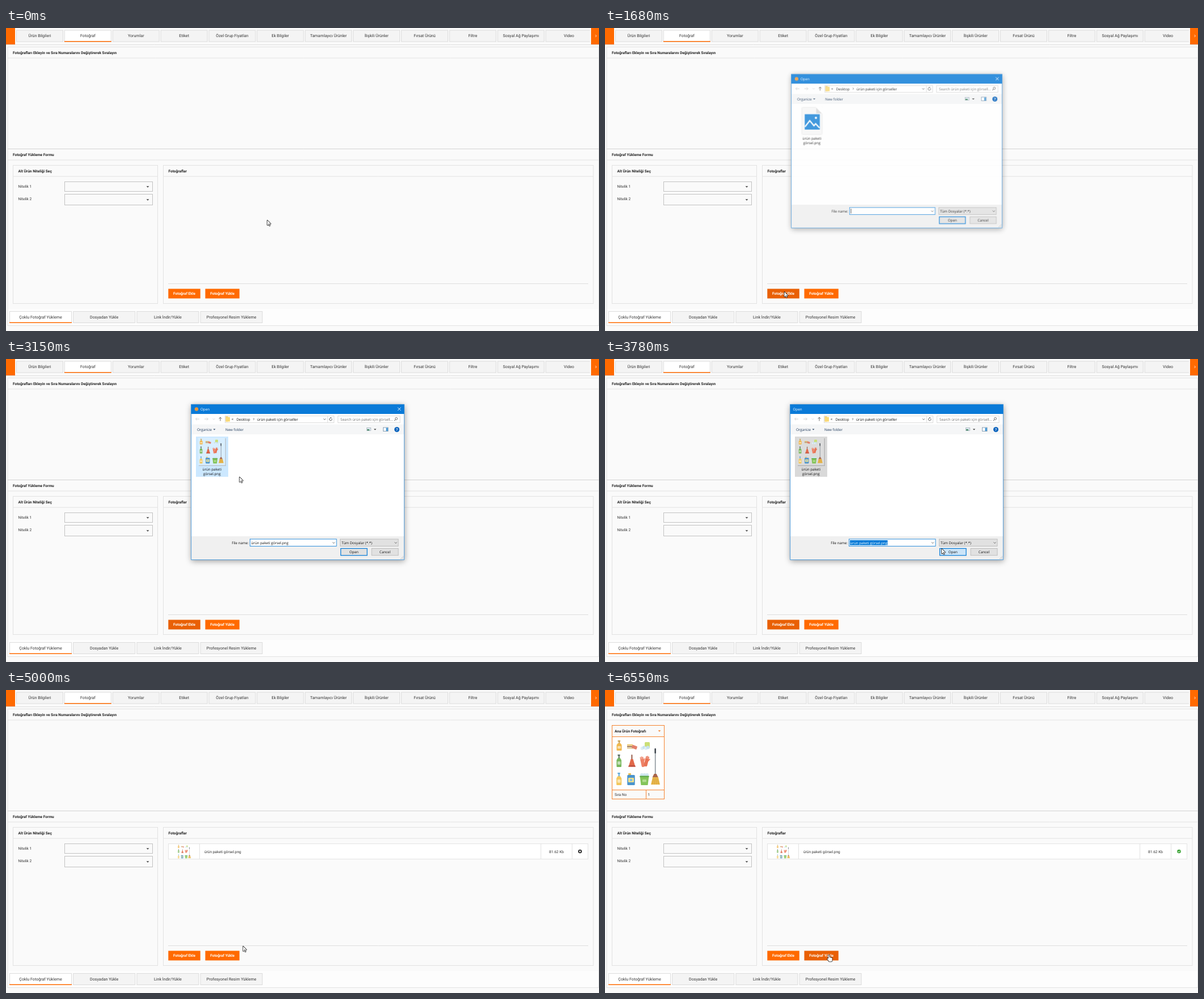
An HTML page with a canvas that plays this animation: 1046x535 px, repeating every 7410 ms.

```html
<!DOCTYPE html>
<html lang="tr">
<head>
<meta charset="utf-8">
<title>Fotoğraf Yükleme</title>
<style>
html, body { margin: 0; width: 100%; height: 100%; overflow: hidden; background: #fafafa; }
canvas { display: block; width: 1046px; height: 535px; }
</style>
</head>
<body>
<canvas id="stage"></canvas>
<script>
const W = 1046, H = 535, LOOP = 7410, TICK = 76.7;
const ORANGE = '#ff6a00', DARK = '#e96005', LIGHT = '#f58a42', BLUE = '#0078d7';
const BG = '#fafafa', EDGE = '#e2e2e2', INK = '#111';
const dpr = window.devicePixelRatio || 1;

function setup(canvas) {
  canvas.width = W * dpr;
  canvas.height = H * dpr;
  const ctx = canvas.getContext('2d');
  ctx.scale(dpr, dpr);
  ctx.textRendering = 'geometricPrecision';
  return ctx;
}
const main = setup(document.getElementById('stage'));
const layer = setup(document.createElement('canvas'));
let c = main;

// ---------- shapes ----------
function rect(fill, x, y, w, h, r = 0) {
  c.fillStyle = fill;
  c.beginPath();
  c.roundRect(x, y, w, h, r);
  c.fill();
}
function box(fill, stroke, x, y, w, h, lw = 1) {
  rect(fill, x, y, w, h);
  c.strokeStyle = stroke;
  c.lineWidth = lw;
  c.strokeRect(x, y, w, h);
}
function disc(fill, x, y, r) {
  c.fillStyle = fill;
  c.beginPath();
  c.arc(x, y, r, 0, 7);
  c.fill();
}
function ring(color, x, y, r, from = 0, to = 7) {
  c.strokeStyle = color;
  c.lineWidth = 0.8;
  c.beginPath();
  c.arc(x, y, r, from, to);
  c.stroke();
}
function line(color, lw, ...pts) {
  c.beginPath();
  for (let i = 0; i < pts.length; i += 2) c.lineTo(pts[i], pts[i + 1]);
  c.strokeStyle = color;
  c.lineWidth = lw;
  c.stroke();
}
const hline = (x1, x2, y, color = EDGE) => line(color, 1, x1, y, x2, y);
const vline = (x, y1, y2, color = EDGE) => line(color, 1, x, y1, x, y2);

// symmetric trapezoid, centred on x
function trap(fill, x, y, top, bottom, h) {
  c.fillStyle = fill;
  c.beginPath();
  c.moveTo(x - top / 2, y);
  c.lineTo(x + top / 2, y);
  c.lineTo(x + bottom / 2, y + h);
  c.lineTo(x - bottom / 2, y + h);
  c.fill();
}
function at(x, y, angle, paint) {
  c.save();
  c.translate(x, y);
  c.rotate(angle);
  paint();
  c.restore();
}
const caret = (fill, x, y, s) => trap(fill, x, y - s / 2, s * 2, 0, s);
const cross = (color, x, y, s, lw) => {
  line(color, lw, x - s, y - s, x + s, y + s);
  line(color, lw, x + s, y - s, x - s, y + s);
};
// angle 0 points right
const chevron = (color, x, y, angle = Math.PI / 2, s = 2) =>
  at(x, y, angle, () => line(color, 0.8, -s / 2, -s, s / 2, 0, -s / 2, s));
const arrow = (color, x, y, angle) => at(x, y, angle, () => {
  line(color, 0.8, -3.2, 0, 3.2, 0);
  chevron(color, 2, 0, 0, 2.4);
});

// ---------- text; y is the middle of the capitals ----------
function write(str, x, y, face, size, color, align) {
  c.font = face.replace('$', size + 'px');
  c.fillStyle = color;
  c.textAlign = align;
  c.fillText(str, x, y + size * 0.36);
}
const text = (s, x, y, size = 6.55, align = 'left') =>
  write(s, x, y, '400 $ Roboto, sans-serif', size, '#333', align);
const bold = (s, x, y, color = '#222', align = 'left') =>
  write(s, x, y, '700 $ Roboto, sans-serif', 6.55, color, align);
const ui = (s, x, y, color = INK, align = 'left') =>
  write(s, x, y, '400 $ "Open Sans", sans-serif', 6.25, color, align);

// ---------- product picture ----------
function bottle(x, y, w, h, body, cap) {
  const neck = h * 0.28;
  rect(cap, x - w * 0.3, y, w * 0.55, 2, 1);
  rect(cap, x - w * 0.12, y, w * 0.24, neck + 1);
  trap(body, x, y + neck, w * 0.5, w, h * 0.16);
  rect(body, x - w / 2, y + neck + h * 0.14, w, h * 0.58, 1.2);
  rect('rgba(255,255,255,.55)', x - w * 0.32, y + h * 0.55, w * 0.64, h * 0.26, 1);
}
function glove(x, y, tilt, fill) {
  at(x, y, tilt, () => {
    rect(fill, -3, -4, 6, 14, 2);
    for (let i = 0; i < 3; i++) rect(fill, -3 + i * 2.1, -9 + Math.abs(i - 1), 1.6, 8, 0.8);
    at(3, -1, 0.5, () => rect(fill, -1, -4, 1.8, 6, 0.9));
  });
}
function products(x, y, scale) {
  c.save();
  c.translate(x, y);
  c.scale(scale, scale);
  bottle(25, 89, 9, 18, '#f1b84d', '#c6a058');
  bottle(24.7, 114, 8.5, 22, '#78b75c', '#53695a');
  bottle(24.7, 146, 9, 22, '#f3c75c', '#62a9d8');

  for (let i = 0; i < 3; i++) rect(['#ecc76f', '#a58161', '#e6d3a6'][i], 39, 96 + i * 2.8, 10, 2.4);
  at(52, 101, 0.35, () => rect('#e3806b', -4.5, -3, 9, 6, 1));

  rect('#cbdf76', 70, 92, 9, 11, 1.5);
  for (let i = 0; i < 4; i++) disc(i % 2 ? '#c8e2ee' : '#dfeff6', 65.5 + i * 3.4, 103 - (i % 2) * 1.6, 2.9);

  rect('#955a49', 46.4, 114, 2, 10, 1);
  trap('#e2694a', 47.5, 122, 4, 12, 13.5);
  trap('#bd5140', 47.5, 133, 11, 13, 2.5);

  glove(66, 126, -0.2, '#ee8267');
  glove(73.5, 125, 0.25, '#e87355');

  rect('#e8bd50', 41, 147, 5, 3, 1);
  rect('#4b94cd', 39.3, 150, 13.4, 18, 1.5);
  rect('#f5e08a', 41, 155, 10, 8, 1);
  disc('#7fc0e2', 46, 159, 2.3);

  for (let i = 0; i < 3; i++) disc('#cfe7f0', 65 + i * 4.6, 150, 3);
  trap('#84c45a', 69.5, 152, 16, 12, 16);
  rect('#5ca848', 61.3, 151.5, 16.4, 2.2, 1);
  rect('#b2dc90', 66, 158, 7, 4.5, 1);

  rect('#8d949c', 87.9, 104, 1.6, 45);
  rect('#444b53', 87.4, 103, 2.6, 9, 1);
  trap('#a9654a', 88.7, 148, 4, 10, 6);
  trap('#e9b84c', 89, 154, 10, 16, 13);
  for (let i = -1.5; i < 2; i++) line('#cf9637', 0.6, 89 + i * 2.2, 156, 89 + i * 3.6, 167);
  c.restore();
}

// ---------- page ----------
const TABS = ['Ürün Bilgileri', 'Fotoğraf', 'Yorumlar', 'Etiket', 'Özel Grup Fiyatları', 'Ek Bilgiler',
  'Tamamlayıcı Ürünler', 'İlişkili Ürünler', 'Fırsat Ürünü', 'Filtre', 'Sosyal Ağ Paylaşımı', 'Video'];
const MODES = ['Çoklu Fotoğraf Yükleme', 'Dosyadan Yükle', 'Link İndir/Yükle', 'Profesyonel Resim Yükleme'];

function tab(label, x, y, w, active) {
  box(active ? '#fff' : '#f4f4f4', '#dcdcdc', x, y, w, 20);
  if (active) rect(ORANGE, x - 0.5, y + 18.9, w + 1, 1.7);
  text(label, x + w / 2, y + 9.7, 7.1, 'center');
}
function panel(title, x, y, w, h) {
  box(BG, EDGE, x, y, w, h);
  hline(x, x + w, y + 19.5);
  bold(title, x + 9, y + 10);
}
function select(label, y, h) {
  text(label, 21.5, y + 8);
  box(BG, '#c2c2c2', 103.5, y, 155, h);
  caret('#444', 250, y + h / 2 + 0.5, 2.4);
}
function button(label, x, w, fill) {
  rect(fill, x, 460.5, w, 17);
  bold(label, x + w / 2, 469, '#fff', 'center');
}
function page(addFill, sendFill) {
  rect(BG, 0, 0, W, H);
  TABS.forEach((s, i) => tab(s, 18.5 + 84.87 * i, 4, 82, i === 1));
  rect(BG, 1030, 0, 2, 29);
  rect(ORANGE, 0, 0, 16, 29);
  rect(ORANGE, 1032, 0, 14, 29);
  chevron('#fff', 1040.5, 14, 0);
  hline(0, W, 29.5, '#dedede');

  panel('Fotoğrafları Ekleyin ve Sıra Numaralarını Değiştirerek Sıralayın', 3, 33.5, 1042.5, 180);
  panel('Fotoğraf Yükleme Formu', 3, 213.5, 1042.5, 312);
  hline(3, W, 213.5, '#d2d2d2');
  rect('#fdfdfd', 4, 496, 1041, 29);

  panel('Alt Ürün Niteliği Seç', 12.5, 242.5, 255, 244);
  select('Nitelik 1', 271.5, 17);
  select('Nitelik 2', 293.5, 19);

  panel('Fotoğraflar', 277.5, 242.5, 758.5, 244);
  hline(286, 1027, 451.5, '#dedede');
  button('Fotoğraf Ekle', 286.3, 56.5, addFill);
  button('Fotoğraf Yükle', 351.5, 60.3, sendFill);
  MODES.forEach((s, i) => tab(s, 6.5 + 112.2 * i, 500.5, 109, i === 0));
}
function fileRow(done) {
  box('#fff', '#e4e4e4', 286.5, 271.5, 740, 27);
  for (const x of [341.5, 943.5, 998.5]) vline(x, 271, 298);
  c.save();
  c.beginPath();
  c.rect(288, 272, 52, 26);
  c.clip();
  c.globalAlpha = 0.8;
  products(297, 246.8, 0.3);
  c.restore();
  text('ürün paketi görsel.png', 350, 285.3);
  text('81.62 Kb', 971, 285.3, 6.55, 'center');
  disc(done ? '#3fa63a' : '#222', 1012.5, 285, 3.3);
  if (done) line('#fff', 1, 1010.8, 285, 1012.1, 286.3, 1014.3, 283.9);
  else cross('#fff', 1012.5, 285, 1.3, 1.1);
}
function card() {
  const edge = '#f5832f';
  box('#fff', edge, 12.5, 62.5, 92, 130);
  rect(BG, 13, 63, 91, 19);
  rect(BG, 13, 177, 91, 15);
  hline(12, 104, 82.5, edge);
  hline(12, 104, 176.5, edge);
  vline(72.5, 176, 192, edge);
  bold('Ana Ürün Fotoğrafı', 17, 72.3);
  caret(edge, 96, 72.5, 2.4);
  products(0, 0, 1);
  text('Sıra No', 17, 184.5);
  text('1', 75.5, 184.5);
}

// ---------- file dialog ----------
function blankIcon() {
  c.shadowColor = 'rgba(0,0,0,.25)';
  c.shadowBlur = 2 * dpr;
  rect('#f7f7f7', 346, 140, 35, 47);
  c.shadowColor = 'transparent';
  at(376, 145, Math.PI / 4, () => {
    rect('#fff', -8, -8, 16, 8);
    trap('#dadada', 0, 0, 14, 0, 7);
  });
  rect('#fff', 349.5, 150.5, 29, 29.5);
  rect('#1d86d8', 350.5, 151.5, 27, 27.5);
  line('#fff', 2.2, 351, 174, 359.5, 163, 367, 172, 370, 168.5, 377, 176);
  disc('#fff', 370.5, 158, 2);
}
function fileItem(t, chosen, grey) {
  if (t >= 2150) rect(grey ? '#d9d9d9' : chosen ? '#cce8ff' : '#e5f3ff', 335, 137, 57, 71);
  if (t < 1910) {
    blankIcon();
  } else {
    rect(grey ? '#b5b5b5' : '#bcc6ce', 340, 140, 48, 49);
    rect(grey ? '#dcdcdc' : chosen ? '#d8eeff' : '#f0f8ff', 339, 139, 47.5, 48.5);
    products(330.5, 92, 0.55);
  }
  ui('ürün paketi', 363.3, 195, INK, 'center');
  ui('görsel.png', 363.3, 203, INK, 'center');
}
function uiButton(label, x, w, fill, edge, lw) {
  box(fill, edge, x, 334.5, w, 12.3, lw);
  ui(label, x + w / 2, 340.8, INK, 'center');
}
function addressRow() {
  arrow('#c9c9c9', 337.8, 106, Math.PI);
  arrow('#c9c9c9', 353.2, 106, 0);
  chevron('#d5d5d5', 366.5, 106);
  arrow('#444', 378, 106.2, -Math.PI / 2);
  box('#fff', '#dcdcdc', 386.5, 100.5, 192, 12);
  vline(567.5, 100, 112, '#dcdcdc');
  rect('#e8bf55', 387.5, 101.5, 4, 9);
  rect('#f8d978', 388, 102.5, 7, 8);
  ui('«', 398, 106);
  ui('Desktop', 406.5, 106.3);
  chevron('#444', 437, 106, 0, 1.6);
  ui('ürün paketi için görseller', 443, 106.3);
  chevron('#444', 562, 106.3);
  ring('#444', 572.7, 106.5, 2.3, -0.6, 4.6);
  caret('#444', 573, 104, 1.6);
  box('#fff', '#dcdcdc', 585.5, 100.5, 109.5, 12);
  ui('Search ürün paketi için görsell...', 590, 106.3, '#6d6d6d');
  ring('#555', 688.5, 105.3, 2);
  line('#555', 1, 687, 106.8, 685, 109);
}
function toolbar() {
  const navy = '#1e395b';
  rect('#f5f6f7', 327, 115.5, 375, 17.5);
  ui('Organize', 337, 124.5, navy);
  caret(navy, 367.5, 124.5, 2);
  ui('New folder', 387, 124.5, navy);
  box('#dfeaf2', '#9aa7b2', 636.5, 121.5, 7, 5, 0.7);
  rect('#4c8f6a', 637, 124, 4, 2.3);
  caret('#222', 651, 124.5, 2.2);
  box('#fff', '#6b8aa5', 665.5, 121, 8.5, 6.5, 0.8);
  rect('#3f95d5', 670.5, 121.5, 3.2, 5.6);
  disc('#0a64bd', 689.5, 124.5, 4.5);
  write('?', 689.5, 124.5, '700 $ "Open Sans", sans-serif', 6.5, '#fff', 'center');
}
function footer(t, chosen, marked) {
  rect('#f0f0f0', 327, 313, 375, 41);
  ui('File name:', 428, 324.3, INK, 'right');
  box('#fff', BLUE, 430.5, 318, 152.5, 12.5, 0.8);
  if (marked) rect(BLUE, 432, 320, 66.5, 8.8);
  if (chosen) ui('ürün paketi görsel.png', 432.5, 324.3, marked ? '#fff' : INK);
  else if (Math.floor((t - 1600) / 530) % 2 === 0) line(INK, 0.8, 433, 320, 433, 328.5);
  chevron('#444', 578, 324.5);
  box('#e1e1e1', '#b4b4b4', 589.5, 318, 102.5, 12.5, 0.8);
  ui('Tüm Dosyalar (*.*)', 592, 324.3);
  chevron('#444', 687.5, 324.5);
  uiButton('Open', 590.5, 46.5, t >= 3620 ? '#cbe4f8' : '#e1e1e1', BLUE, 1.2);
  uiButton('Cancel', 645, 47, '#e1e1e1', '#b4b4b4', 0.8);
  for (let row = 0; row < 3; row++)
    for (let col = 0; col < 3 - row; col++) rect('#b5b5b5', 700 - col * 2, 352 - row * 2, 1, 1);
}
function dialog(t) {
  const closing = t >= 3780, chosen = t >= 2850, marked = t >= 3700;
  c.shadowColor = 'rgba(0,0,0,.38)';
  c.shadowBlur = 10 * dpr;
  c.shadowOffsetY = 2 * dpr;
  rect('#fff', 326.5, 80, 376, 274.5);
  c.shadowColor = 'transparent';
  c.shadowBlur = c.shadowOffsetY = 0;

  rect('#0a7ad8', 326.5, 80, 376, 17);
  ui('Open', closing ? 331.5 : 343, 88.7, '#fff');
  if (!closing) {
    disc('#e8953a', 336, 88.5, 3.2);
    cross('#fff', 693.7, 88.3, 2.7, 0.9);
  }
  addressRow();
  toolbar();
  fileItem(t, chosen, marked);
  footer(t, chosen, marked);
  c.strokeStyle = '#2b87d3';
  c.lineWidth = 0.8;
  c.strokeRect(326.7, 80.2, 375.6, 274.2);
}
function showDialog(t) {
  const shown = t >= 3860 ? 0.45 : 1 - Math.pow(1 - Math.min(1, ticks(t, 1600, 1) / 3), 1.6);
  const scale = 0.94 + 0.06 * shown;
  layer.clearRect(0, 0, W, H);
  c = layer;
  dialog(t);
  c = main;
  c.save();
  c.globalAlpha = shown;
  c.translate(514.5, 217.25);
  c.scale(scale, scale);
  c.drawImage(layer.canvas, -514.5, -217.25, W, H);
  c.restore();
}

// ---------- pointer ----------
const STOPS = [[461, 339.5], [316.5, 466], [366.5, 177], [594, 335], [395, 468]];
const STARTS = [360, 1760, 3000, 4470];

function ticks(t, from, lead) {
  return t < from ? 0 : Math.floor((t - from) / TICK + 0.15) + lead;
}
function pointerAt(t) {
  const leg = Math.max(0, STARTS.filter(s => t >= s).length - 1);
  const p = Math.min(1, ticks(t, STARTS[leg], 0.87) / 10);
  const e = p * p * (3 - 2 * p);
  return STOPS[leg].map((v, i) => v + (STOPS[leg + 1][i] - v) * e);
}
function arrowShape() {
  const p = new Path2D('M0 0V8.6L6 6.2Z');
  const tail = new Path2D();
  tail.roundRect(-0.7, 0, 1.4, 4.4, 0.3);
  p.addPath(tail, new DOMMatrix([0.92, -0, 0, 0.92, 2.6, 6]).rotate(-23));
  return p;
}
function handShape() {
  const p = new Path2D();
  p.roundRect(-0.8, 0, 1.7, 8, 0.8);
  for (let i = 1; i < 4; i++) p.roundRect(-0.8 + i * 1.6, 3.3 + i * 0.5, 1.7, 5, 0.8);
  p.roundRect(-0.8, 5.5, 6.4, 6, 1.5);
  p.roundRect(-2.8, 6, 3, 2.4, 1);
  return p;
}
const ARROW = arrowShape(), HAND = handShape();

function pointer(x, y, hand, busy) {
  if (busy) {
    disc('#2c7fcb', x + 6.5, y - 0.5, 4.8);
    disc('#6f9fc4', x + 6.5, y - 0.5, 2.4);
  }
  const shape = hand ? HAND : ARROW;
  at(x, y, 0, () => {
    c.lineJoin = 'round';
    c.lineWidth = 1.5;
    c.strokeStyle = INK;
    c.stroke(shape);
    c.fillStyle = '#fff';
    c.fill(shape);
  });
}

// ---------- timeline ----------
function draw(t) {
  const [x, y] = pointerAt(t);
  const between = (a, b) => t >= a && t < b;
  const onRow = y > 460 && y < 478;
  const overAdd = onRow && x > 286 && x < 343;
  const overSend = onRow && x > 351 && x < 412;
  const addFill = between(1220, 1450) ? LIGHT : overAdd || between(1050, 3860) ? DARK : ORANGE;
  const sendFill = between(5320, 5470) ? LIGHT : overSend ? DARK : ORANGE;

  page(addFill, sendFill);
  if (t >= 4010) fileRow(t >= 6170);
  if (t >= 6170) card();
  if (between(1600, 3930)) showDialog(t);
  pointer(x, y, overSend || (overAdd && t < 1300), between(1300, 1600));
}
function tick() {
  draw(performance.now() % LOOP);
  requestAnimationFrame(tick);
}
tick();
</script>
</body>
</html>
```
